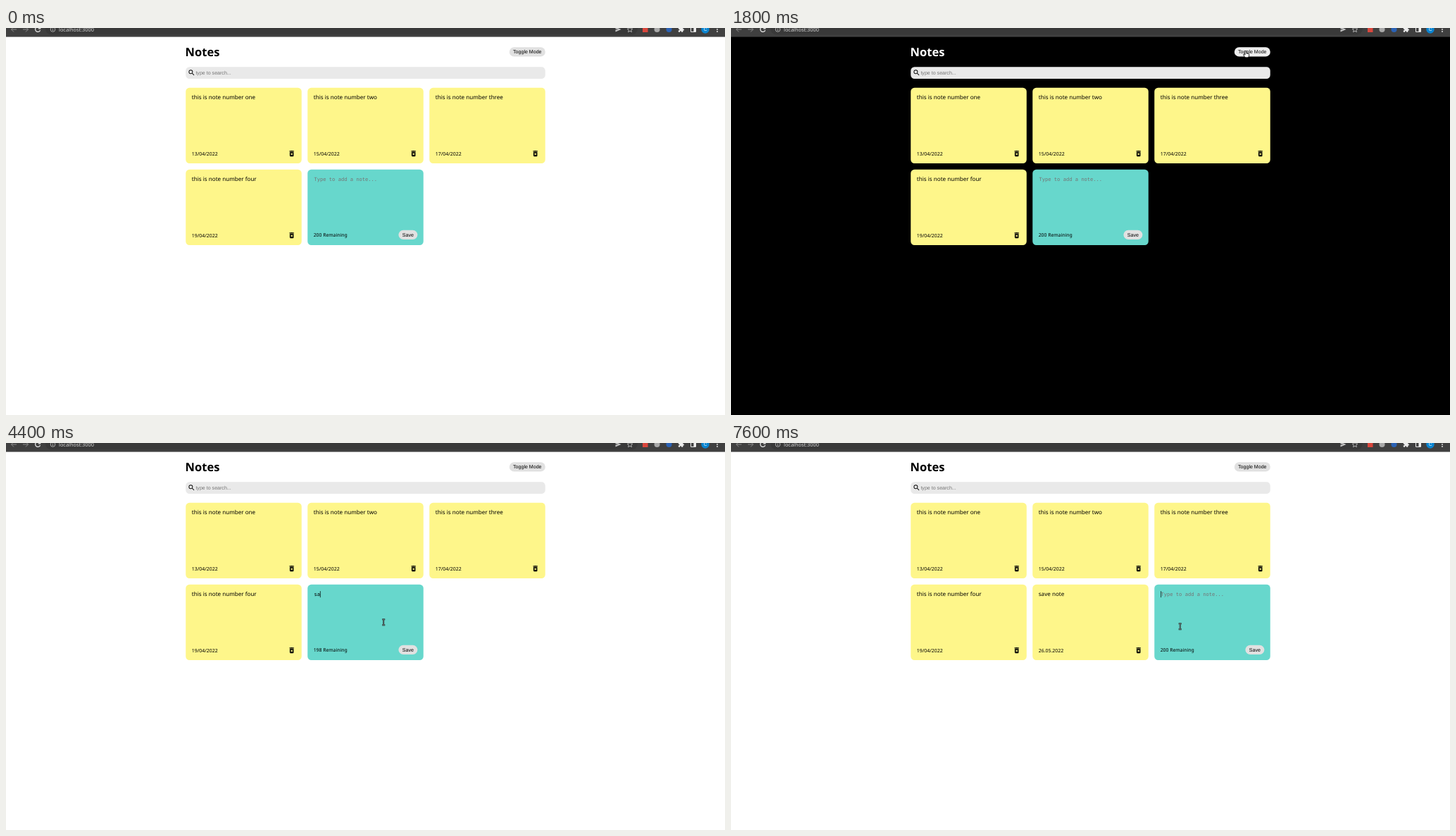
Write an HTML page that moves like this. It is 1021x549 px and loops after 8000 ms.

```html
<!DOCTYPE html>
<html lang="en">
<head>
<meta charset="utf-8">
<title>Notes</title>
<style>
  html, body { margin: 0; width: 100%; height: 100%; overflow: hidden; background: #fff; }
  svg { display: block; width: 100%; height: 100%; }
  text { white-space: pre; text-rendering: geometricPrecision; font-family: "Noto Sans", sans-serif; }
  .title { font-size: 16.5px; font-weight: 700; }
  .note { font-size: 8.09px; }
  .date { font-size: 6.95px; }
  .left { font-size: 6.83px; }
  .url { font-size: 7.37px; fill: #d4d4d4; }
  .ui { font: 7.09px "Liberation Sans", sans-serif; }
  .mono { font: 7.09px "DejaVu Sans Mono", monospace; }
  .hint { fill: #757575; }
</style>
</head>
<body>
<svg id="stage" viewBox="0 0 1021 549">
  <rect id="page" width="1021" height="549"/>
  <g id="bar">
    <rect width="1021" height="12.6" fill="#404040"/>
    <rect x="56" y="-8" width="841" height="17.5" rx="8.7" fill="#393939"/>
    <g fill="none" stroke-width="1" stroke="#8b8b8b">
      <path d="M15 2H7.5M11-1.5L7.5 2L11 5.500M24 2h7.500M28-1.500L31.500 2L28 5.500"/>
      <path stroke="#eee" stroke-width="1.2" d="M48-.5A3.600 3.600 0 1 0 48.600 3.200M48.700-2V.8H45.800"/>
      <g stroke="#c8c8c8" stroke-width=".8">
        <circle cx="66.500" cy="2" r="3.300"/>
        <path d="M66.500 1.600V4M66.500 0V.7"/>
        <path d="M886-1.600l1.100 2.500 2.700.3-2 1.800.6 2.700-2.400-1.400-2.400 1.400.6-2.700-2-1.800 2.700-.3z"/>
      </g>
    </g>
    <text class="url" x="75" y="5">localhost:3000</text>
    <path d="M865.500-1.500L873.500 2L865.500 5.500V2.700L870 2L865.500 1.300z" fill="#c8c8c8"/>
    <rect x="904" y="-1.500" width="7.500" height="7.500" fill="#d9473d"/>
    <circle cx="924.500" cy="2" r="4" fill="#a9a9a9"/>
    <circle cx="941.500" cy="2" r="4" fill="#2b62b5"/>
    <path transform="translate(954 -2.800) scale(.39)" fill="#eee" d="M20.500 11H19V7c0-1.100-.9-2-2-2h-4V3.500a2.500 2.500 0 0 0-5 0V5H4c-1.100 0-2 .9-2 2v3.800h1.500a2.700 2.700 0 0 1 0 5.400H2V20c0 1.100.9 2 2 2h3.800v-1.500a2.700 2.700 0 0 1 5.400 0V22H17c1.100 0 2-.9 2-2v-4h1.500a2.500 2.500 0 0 0 0-5z"/>
    <path d="M972.500-1.200h7v6.600h-7z" fill="none" stroke="#eee"/>
    <path d="M976.500-1h3v6h-3z" fill="#eee"/>
    <circle cx="993" cy="2" r="5.700" fill="#0a84d0"/>
    <text class="ui" x="993" y="4.400" text-anchor="middle" style="font-size:6.500px" fill="#fff">C</text>
    <g fill="#eee"><circle cx="1010" cy="-1" r=".9"/><circle cx="1010" cy="2" r=".9"/><circle cx="1010" cy="5" r=".9"/></g>
  </g>
  <g id="head"></g>
  <g id="cards"></g>
  <g id="pointer"></g>
</svg>
<script>
const LOOP = 8000, STEP = 100;
const $ = id => document.getElementById(id);
const YELLOW = '#fef68a', TEAL = '#67d7cc', GREY = '#e1e1e1', HOVER = '#ededed';
const CARD_W = 164.5, CARD_H = 107.4, GAP = 8.5, CHAR = 7.09 * 0.602;
const SEARCH = 'M15.5 14h-.79l-.28-.27A6.471 6.471 0 0016 9.5 6.5 6.5 0 109.5 16c1.61 0 3.09-.59 4.23-1.57l.27.28v.79l5 4.99L20.49 19l-4.99-5zm-6 0C7.01 14 5 11.99 5 9.5S7.01 5 9.5 5 14 7.01 14 9.5 11.99 14 9.5 14z';
const TRASH = 'M6 19c0 1.1.9 2 2 2h8c1.1 0 2-.9 2-2V7H6v12zm2.46-7.12l1.41-1.41L12 12.59l2.12-2.12 1.41 1.41L13.41 14l2.12 2.12-1.41 1.41L12 15.41l-2.12 2.12-1.41-1.41L10.59 14l-2.13-2.12zM15.5 4l-1-1h-5l-1 1H5v2h14V4z';

const DRAFT = 'save note';
const TYPED = [[0, 0], [4400, 2], [4700, 4], [4900, 5], [5300, 6], [5500, 7], [5800, 8], [6000, 9], [7200, 0]];
const CARET_ON = [[3400, 3800], [4400, 6800], [7600, LOOP]];
const NOTES = [
  ['this is note number one', '13/04/2022'],
  ['this is note number two', '15/04/2022'],
  ['this is note number three', '17/04/2022'],
  ['this is note number four', '19/04/2022']
];
const SAVED = [DRAFT, '26.05.2022'];

// time, x, y, shape
const STOPS = [
  [1000, 725, 17, 'arrow'], [1100, 726, 20, 'arrow'], [1200, 727, 22, 'arrow'],
  [1400, 728, 27.5, 'hand'], [1500, 730, 30, 'hand'], [1600, 731, 32.5, 'hand'],
  [2900, 546.5, 249, 'beam'], [3200, 536.5, 253, 'beam'], [3600, 536.2, 254.2, 'beam'],
  [6800, 576, 287.6, 'hand'], [7000, 574, 293.6, 'hand'], [7200, 575, 286, 'arrow'],
  [7400, 637.7, 260.2, 'beam']
];
const SHAPES = {
  arrow: '<path d="M0 0V10.5L2.4 8.3L4 12L5.7 11.2L4.200 7.700H7.500z" fill="#111" stroke="#fff" stroke-width=".7"/>',
  hand: '<path d="M-1 .9a1 1 0 0 1 2 0V3.600h2.200q1.400 0 1.400 1.600V7q0 2.300-2.300 2.300H.2q-1.200 0-1.900-1.100L-3.300 5.700q-.3-1 .9-.9L-1 5.600z" fill="#fff" stroke="#111" stroke-width=".9"/>',
  beam: ['#111" stroke-width="1.9', '#9fc9c4" stroke-width=".6'].map(s =>
    `<path d="M-2-4H2M-2 4H2M0-4V4" fill="none" stroke="${s}"/>`).join('')
};

const text = (cls, x, y, s, extra = '') => `<text class="${cls}" x="${x}" y="${y}" ${extra}>${s}</text>`;
const box = (x, y, w, h, r, fill) =>
  `<rect x="${x}" y="${y}" width="${w}" height="${h}" rx="${r}" fill="${fill}"/>`;
const icon = (d, x, y) => `<path transform="translate(${x} ${y}) scale(.461)" d="${d}"/>`;
const last = (list, t) => list.filter(k => k[0] <= t).pop();
const slot = i => [255.25 + (i % 3) * (CARD_W + GAP), 84.7 + Math.floor(i / 3) * 116];

function pointerAt(t) {
  if (t < 200) return null;
  if (t >= 1000) {
    const [, x, y, shape] = last(STOPS, t);
    return { x, y, shape };
  }
  const u = 1 - (1 - (t - 200) / 800) ** 1.6, v = 1 - u;
  const bend = (a, b, c) => v * v * a + 2 * v * u * b + u * u * c;
  const p = { x: bend(56, 740, 725), y: bend(9, 173, 17) };
  p.shape = onToggle(p) ? 'hand' : 'arrow';
  return p;
}

const onToggle = p => p.x > 715 && p.x < 766 && p.y > 27 && p.y < 40.5;

function noteCard([body, date], i) {
  const [x, y] = slot(i);
  return box(x, y, CARD_W, CARD_H, 5.3, YELLOW) +
    text('note', x + 8.5, y + 16.3, body) +
    text('date', x + 8.5, y + 95.9, date) +
    icon(TRASH, x + 144.9, y + 87.8);
}

function addCard(i, t) {
  const [x, y] = slot(i);
  const n = last(TYPED, t)[1], tx = x + 9.3;
  const hover = t >= 6800 && t < 7200;
  const caret = CARET_ON.some(([a, b]) => t >= a && t < b);
  return box(x, y, CARD_W, CARD_H, 5.3, TEAL) +
    (n ? text('mono', tx, y + 132 - 116, DRAFT.slice(0, n))
       : text('mono hint', tx, y + 16, 'Type to add a note...')) +
    (caret ? box(tx + n * CHAR - .2, y + 9.400, .7, 9, 0, '#000') : '') +
    text('left', x + 8.4, y + 94.9, `${200 - n} Remaining`) +
    box(x + 129.2, y + 86, 26.9, 13.2, 6.6, hover ? HOVER : GREY) +
    text('ui', x + 142.6, y + 94.9, 'Save', 'text-anchor="middle"');
}

function draw(t) {
  const dark = t >= 1800 && t < 2500;
  const p = pointerAt(t);
  $('page').setAttribute('fill', dark ? '#000' : '#fff');
  $('head').innerHTML =
    text('title', 254.6, 40, 'Notes', `fill="${dark ? '#fff' : '#000'}"`) +
    box(714.8, 27.3, 51, 13.2, 6.6, p && onToggle(p) ? HOVER : GREY) +
    text('ui', 740.3, 36.4, 'Toggle Mode', 'text-anchor="middle"') +
    box(255.25, 55.3, 510.5, 16.7, 5.3, '#e9e9e9') +
    icon(SEARCH, 258, 57.9) +
    text('ui hint', 269.4, 66.2, 'type to search...');
  const notes = t < 7200 ? NOTES : [...NOTES, SAVED];
  $('cards').innerHTML = notes.map(noteCard).join('') + addCard(notes.length, t);
  $('pointer').innerHTML = p ? `<g transform="translate(${p.x} ${p.y})">${SHAPES[p.shape]}</g>` : '';
}

const start = performance.now();
let shown = -1;
function tick() {
  const t = Math.floor(((performance.now() - start) % LOOP) / STEP) * STEP;
  if (t !== shown) draw(shown = t);
  requestAnimationFrame(tick);
}
tick();
</script>
</body>
</html>
```
